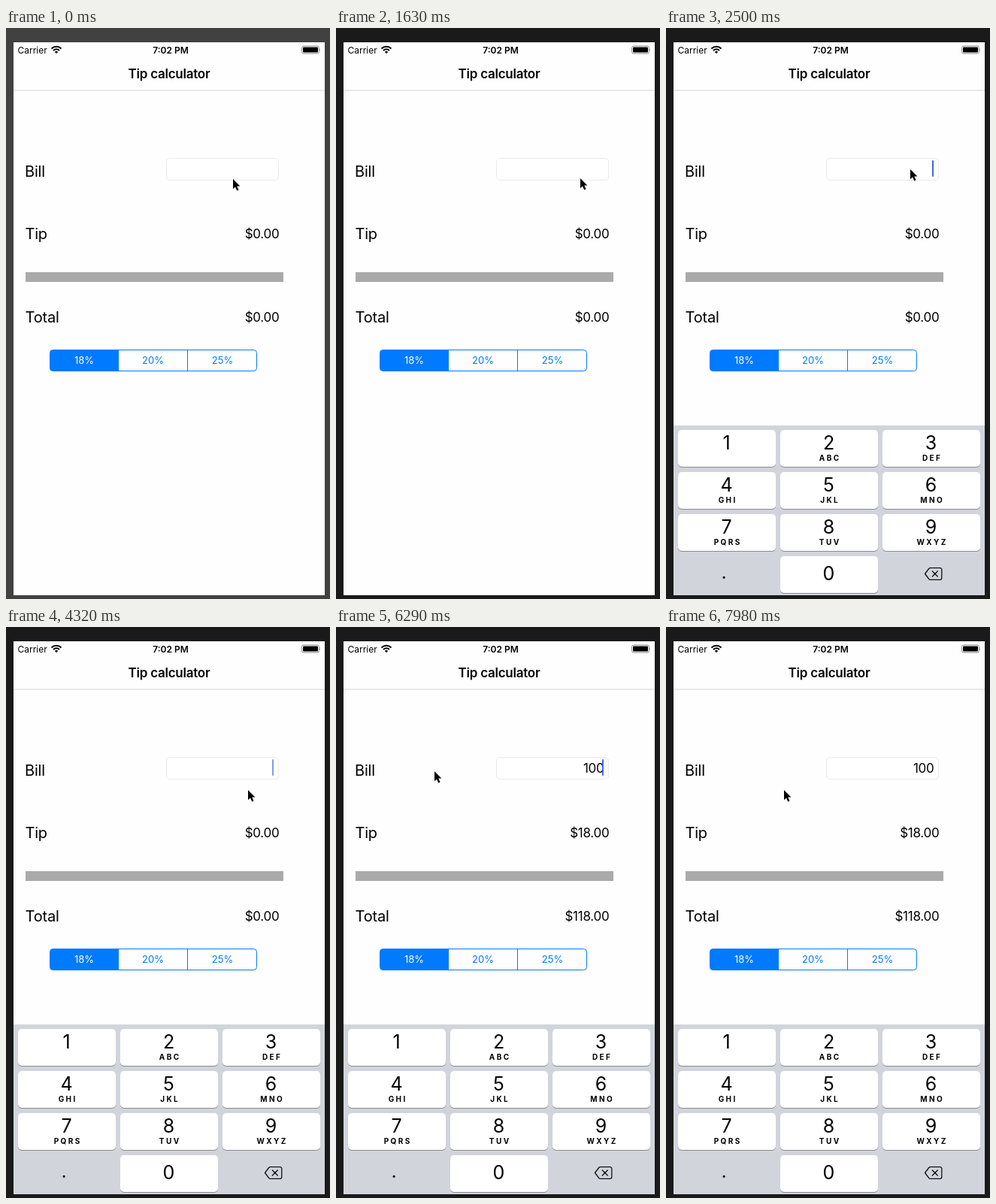
An HTML page for the animation above (8 s loop, 431x760 px).

```html
<!DOCTYPE html>
<html lang="en">
<head>
<meta charset="utf-8">
<title>Tip calculator</title>
<style>
  html, body { margin: 0; width: 100%; height: 100%; overflow: hidden; background: #1a1a1a; }
  svg { display: block; width: 100vw; height: 100vh; }
  text { font-family: Inter, Roboto, "Liberation Sans", sans-serif; fill: #000; }
  .label { font-size: 20px; letter-spacing: -0.2px; }
  .value { font-size: 17px; letter-spacing: -0.25px; text-anchor: end; }
  .mid { text-anchor: middle; }
  .status { font-size: 12px; }
  .title { font-size: 17px; font-weight: 600; letter-spacing: -0.25px; }
  .segment { font-size: 13px; fill: #007aff; }
  .digit { font-size: 25px; }
  .letters { font-size: 10px; font-weight: 700; letter-spacing: 2.4px; }
</style>
</head>
<body>
<svg viewBox="0 0 431 760" xmlns="http://www.w3.org/2000/svg">
  <defs>
    <clipPath id="screenClip"><rect x="10" y="19" width="414" height="736"/></clipPath>
  </defs>
  <rect id="backdrop" width="431" height="760"/>
  <rect x="10" y="19" width="414" height="736" fill="#fefefe"/>

  <text class="status" x="15.5" y="34">Carrier</text>
  <g fill="none" stroke="#000" stroke-width="2">
    <path d="M60.5 27.5A9.2 9.2 0 0 1 73.5 27.5M63 30A5.7 5.7 0 0 1 71 30"/>
    <path d="M64.9 31.9A3 3 0 0 1 69.1 31.9L67 34Z" fill="#000" stroke="none"/>
  </g>
  <text class="status mid" x="219" y="34" font-weight="600">7:02 PM</text>
  <rect x="393.5" y="24" width="23" height="10" rx="2.5" fill="none" stroke="#8a8a8a"/>
  <rect x="395" y="25.5" width="20" height="7" rx="1"/>
  <path d="M417.5 27.2q1.6 1.8 0 3.6z" fill="#8a8a8a"/>

  <text class="title mid" x="217" y="67">Tip calculator</text>
  <rect x="10" y="82.5" width="414" height="1" fill="#d6d6d8"/>

  <text class="label" x="25" y="197.5">Bill</text>
  <text class="label" x="25.5" y="280.5">Tip</text>
  <text class="label" x="25.5" y="391.5">Total</text>
  <rect x="213.5" y="173.5" width="149" height="29" rx="4.5" fill="#fff" stroke="#ebebeb"/>
  <text class="value" id="bill" x="356.5" y="194"></text>
  <rect id="caret" x="354" y="176" width="2" height="22" rx="1" fill="#4067e4"/>
  <text class="value" id="tip" x="363.5" y="280"></text>
  <text class="value" id="total" x="363.5" y="391"></text>
  <rect x="26" y="325" width="343" height="13" fill="#aaa"/>

  <path d="M150 428.5H62.5a4 4 0 0 0-4 4v20a4 4 0 0 0 4 4H150z" fill="#007aff"/>
  <rect x="58.5" y="428.5" width="275" height="28" rx="4" fill="none" stroke="#007aff"/>
  <path d="M241.5 428.5v28" stroke="#007aff"/>
  <text class="segment mid" x="104" y="447" style="fill:#fff">18%</text>
  <text class="segment mid" x="195.5" y="447">20%</text>
  <text class="segment mid" x="288" y="447">25%</text>

  <g clip-path="url(#screenClip)">
    <g id="keyboard">
      <rect x="10" y="529" width="414" height="226" fill="#d1d5db"/>
      <g id="keys"></g>
      <text class="digit mid" x="77" y="733">.</text>
      <path d="M351.5 718.7h13a2.3 2.3 0 0 1 2.3 2.3v11a2.3 2.3 0 0 1-2.3 2.3h-13q-1 0-1.7-.8l-5.3-7 5.3-7q.7-.8 1.7-.8zM354.3 723l7 7m0-7l-7 7"
            fill="none" stroke="#111" stroke-width="1.3" stroke-linejoin="round" stroke-linecap="round"/>
    </g>
  </g>

  <path id="pointer" d="M0 0V13.2L3 10.4L5.2 15.6L7.5 14.6L5.3 9.5H9.4Z"
        stroke="#fff" stroke-width="2" stroke-linejoin="round" paint-order="stroke"/>
</svg>
<script>
const LOOP = 8000;
const TIP_RATE = 0.18;
const KEYBOARD_HEIGHT = 226;
const $ = id => document.getElementById(id);

// Each track is a list of [time, ...values].
const pointerTrack = [
  [700, 302, 201], [820, 312, 196], [920, 320, 195], [1040, 316, 200], [1170, 309, 202],
  [1410, 309, 202], [1520, 316, 203], [1630, 325, 200],
  [1850, 325, 200], [2000, 325, 184], [2240, 325, 184], [2300, 325, 188],
  [2799, 325, 188], [2800, 325, 190], [2949, 325, 190], [2950, 322, 217],
  [4990, 322, 217], [5150, 245, 140], [5290, 130, 92], [5370, 78, 89], [5450, 61, 115],
  [5540, 87, 151], [5830, 114, 180], [6290, 131, 192], [6640, 137, 194],
  [7100, 143, 194], [7480, 143, 194], [7980, 157, 217]
];
const caretTrack = [
  [2499, 0], [2500, 1], [3260, 1], [3490, 0], [3740, 0], [3850, 1],
  [4260, 1], [4440, 0], [4740, 0], [4850, 1],
  [6600, 1], [6780, 0], [7030, 0], [7100, 1], [7520, 1], [7700, 0]
];
const keyboardTrack = [
  [1950, 0], [2060, 0.45], [2239, 0.45], [2240, 0.8], [2300, 0.95], [2499, 0.95], [2500, 1]
];
const backdropTrack = [[60, 65], [340, 26]];
const billSteps = [[0, ""], [5210, "1"], [5890, "10"], [6070, "100"]];

function sample(track, t) {
  const next = track.findIndex(key => key[0] > t);
  if (next === 0) return track[0].slice(1);
  if (next < 0) return track[track.length - 1].slice(1);
  const a = track[next - 1], b = track[next];
  const k = (t - a[0]) / (b[0] - a[0]);
  return a.slice(1).map((v, i) => v + (b[i + 1] - v) * k);
}

function buildKeys() {
  const letters = ["", "ABC", "DEF", "GHI", "JKL", "MNO", "PQRS", "TUV", "WXYZ"];
  const key = (label, sub, col, row) => {
    const x = 16 + col * 136, y = 535 + row * 56, cx = x + 65;
    const baseline = y + (row === 3 ? 32 : 26.3);
    return `<rect x="${x}" y="${y + 1}" width="130" height="49" rx="5" fill="#898c91"/>
      <rect x="${x}" y="${y}" width="130" height="49" rx="5" fill="#fff"/>
      <text class="digit mid" x="${cx - 0.5}" y="${baseline}">${label}</text>
      <text class="letters mid" x="${cx + 1.2}" y="${y + 41}">${sub}</text>`;
  };
  $("keys").innerHTML =
    letters.map((sub, i) => key(i + 1, sub, i % 3, Math.floor(i / 3))).join("") + key(0, "", 1, 3);
}

function render(t) {
  const [x, y] = sample(pointerTrack, t);
  $("pointer").setAttribute("transform", `translate(${Math.round(x)} ${Math.round(y)})`);

  const grey = Math.round(sample(backdropTrack, t < 120 ? 0 : t)[0]);
  $("backdrop").setAttribute("fill", `rgb(${grey},${grey},${grey})`);

  const [shown] = sample(keyboardTrack, t);
  $("keyboard").setAttribute("transform", `translate(0 ${(1 - shown) * KEYBOARD_HEIGHT})`);
  $("caret").setAttribute("opacity", sample(caretTrack, t)[0]);

  const bill = billSteps.filter(step => step[0] <= t).pop()[1];
  const amount = Number(bill);
  $("bill").textContent = bill;
  $("tip").textContent = "$" + (amount * TIP_RATE).toFixed(2);
  $("total").textContent = "$" + (amount * (1 + TIP_RATE)).toFixed(2);
}

buildKeys();
const start = performance.now();
function tick() {
  render((performance.now() - start) % LOOP);
  requestAnimationFrame(tick);
}
tick();
</script>
</body>
</html>
```
